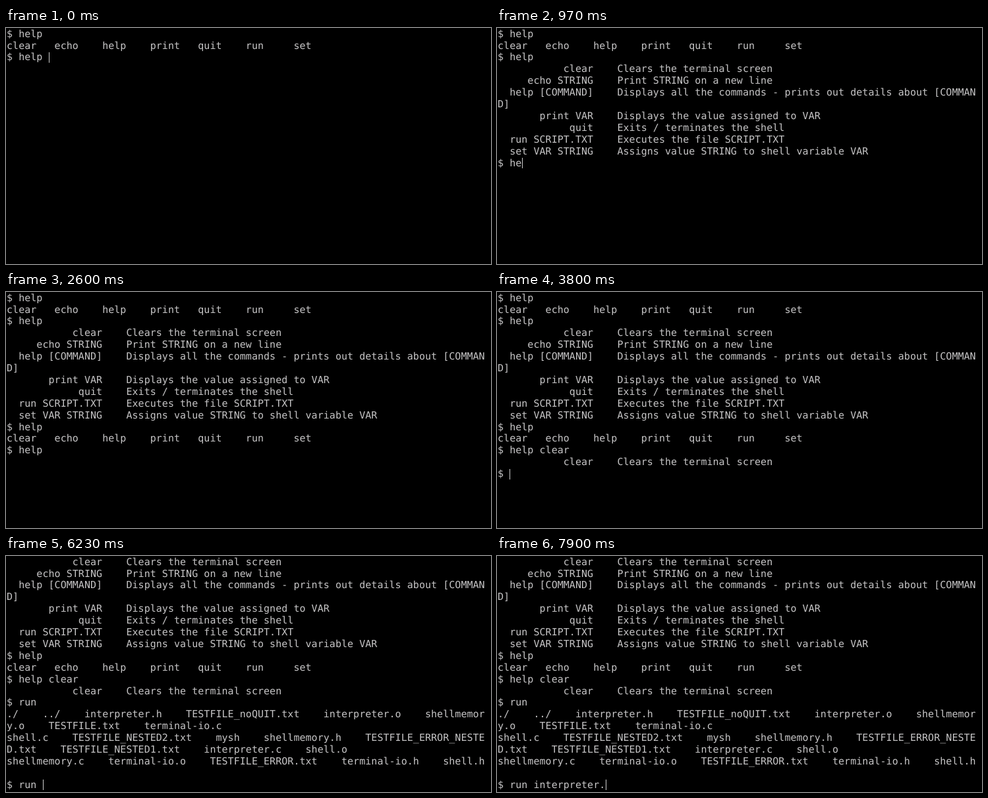
These frames come from a looping animation (736x360 px, 8 s). An HTML page:

```html
<!DOCTYPE html>
<html lang="en">
<head>
<meta charset="utf-8">
<title>Shell help session</title>
<style>
  html, body { margin: 0; width: 100%; height: 100%; overflow: hidden; background: #000; }
  svg { display: block; }
  text {
    font: 15px "DejaVu Sans Mono", monospace;
    letter-spacing: 0.04px;
    white-space: pre;
    text-rendering: geometricPrecision;
    fill: #c6c5c6;
  }
</style>
</head>
<body>
<svg id="stage" width="736" height="360" viewBox="0 0 736 360">
  <rect width="736" height="360" fill="#000"/>
  <g id="screen"></g>
  <rect id="cursor" width="1" height="16" fill="#cfcfcf"/>
</svg>
<script>
const LOOP = 8000, BLINK = 530;
const COLS = 80, ROWS = 20, CELL = 9.07, LINE = 17.9;
const LEFT = 1, BASELINE = 13.6;

const wrap = line => line.match(new RegExp(`.{1,${COLS}}`, 'g')) || [''];
const helpRow = ([usage, about]) => usage.padStart(16) + '    ' + about;

const commands = ['clear', 'echo', 'help', 'print', 'quit', 'run', 'set']
  .map(name => name.padEnd(8)).join('');

const details = [
  ['clear', 'Clears the terminal screen'],
  ['echo STRING', 'Print STRING on a new line'],
  ['help [COMMAND]', 'Displays all the commands - prints out details about [COMMAND]'],
  ['print VAR', 'Displays the value assigned to VAR'],
  ['quit', 'Exits / terminates the shell'],
  ['run SCRIPT.TXT', 'Executes the file SCRIPT.TXT'],
  ['set VAR STRING', 'Assigns value STRING to shell variable VAR']
].map(helpRow);

const files = [
  './ ../ interpreter.h TESTFILE_noQUIT.txt interpreter.o shellmemory.o TESTFILE.txt terminal-io.c',
  'shell.c TESTFILE_NESTED2.txt mysh shellmemory.h TESTFILE_ERROR_NESTED.txt TESTFILE_NESTED1.txt interpreter.c shell.o',
  'shellmemory.c terminal-io.o TESTFILE_ERROR.txt terminal-io.h shell.h',
  ''
].map(row => row.replaceAll(' ', '    '));

// Each event: time, text at the prompt, output printed before that prompt.
const events = [
  [0, 'help '],
  [30, '', details],
  [870, 'h'], [935, 'he'], [1300, 'hel'], [1365, 'help'],
  [1730, '', [commands]],
  [1865, 'h'], [1930, 'he'], [2000, 'hel'], [2065, 'help'],
  [2670, 'help '], [2735, 'help c'], [2830, 'help cl'],
  [2900, 'help cle'], [2970, 'help clea'], [3035, 'help clear'],
  [3605, '', [details[0]]],
  [5470, 'r'], [5600, 'ru'], [5730, 'run'],
  [5970, 'run '],
  [6200, 'run ', files],
  [6265, 'run '],
  [7630, 'run i'], [7700, 'run in'], [7770, 'run int'],
  [7865, 'run interpreter.']
];

// Turn the events into complete screens.
let history = ['$ help', commands], typed = '';
const screens = events.map(([time, text, output]) => {
  if (output) history = [...history, '$ ' + typed, ...output.flatMap(wrap)];
  typed = text;
  return { time, lines: [...history, '$ ' + typed].slice(-ROWS) };
});

const SVG = 'http://www.w3.org/2000/svg';
const group = document.getElementById('screen');
const cursor = document.getElementById('cursor');
const rows = Array.from({ length: ROWS }, (_, i) => {
  const row = document.createElementNS(SVG, 'text');
  row.setAttribute('x', LEFT);
  row.setAttribute('y', BASELINE + i * LINE);
  return group.appendChild(row);
});

let shown;
function render(t) {
  const screen = screens.findLast(s => s.time <= t);
  const { time, lines } = screen;
  if (screen !== shown) {
    rows.forEach((row, i) => { row.textContent = lines[i] || ''; });
    const last = lines.length - 1;
    cursor.setAttribute('x', Math.round(1.3 + lines[last].length * CELL));
    cursor.setAttribute('y', Math.round(1.3 + last * LINE));
    shown = screen;
  }
  const lit = Math.floor((t - time) / BLINK) % 2 === 0;
  cursor.setAttribute('visibility', lit ? 'visible' : 'hidden');
}

const start = performance.now();
function tick() {
  render((performance.now() - start) % LOOP);
  requestAnimationFrame(tick);
}
tick();
</script>
</body>
</html>
```
